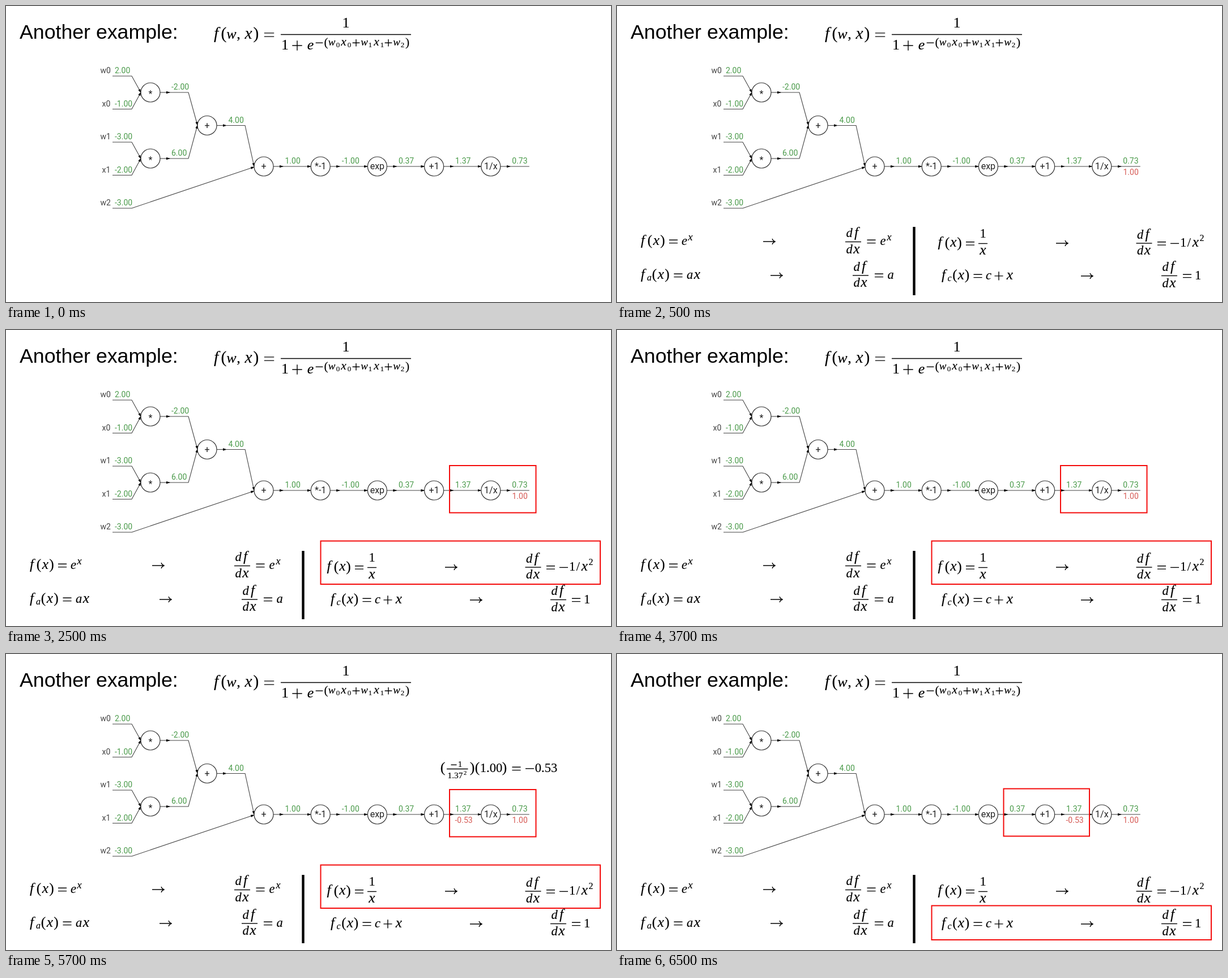
These frames come from a looping animation (1068x524 px, 8000 ms). An HTML page:

```html
<!DOCTYPE html>
<html lang="en">
<head>
<meta charset="utf-8">
<title>Backpropagation example</title>
<style>
  html, body { margin: 0; width: 100%; height: 100%; overflow: hidden; background: #fff; }
  svg { display: block; width: 100vw; height: 100vh; }
  .title { font: 35.7px "Liberation Sans", Arial, sans-serif; }
  .label { font: 14px Roboto, sans-serif; fill: #444; }
  .node { font: 16px Roboto, sans-serif; fill: #222; text-anchor: middle; }
  .value { font: 14px Roboto, sans-serif; fill: #4a9a4a; }
  .grad { font: 14px Roboto, sans-serif; fill: #d65a55; }
  .math { font-family: "Liberation Serif", "Times New Roman", serif; text-anchor: middle; stroke: #000; stroke-width: .15; }
  .op { fill: none; stroke: #000; stroke-width: 1.4; }
  .wire { fill: none; stroke: #444; stroke-width: 1.1; marker-end: url(#tip); }
  .end { marker-end: none; }
  .ring { fill: #fff; stroke: #333; stroke-width: 1.2; }
  .frame { fill: none; stroke: #f40b0b; stroke-width: 2; }
</style>
</head>
<body>
<svg viewBox="0 0 1068 524">
  <defs>
    <marker id="tip" markerUnits="userSpaceOnUse" markerWidth="7" markerHeight="5" refX="6" refY="2.5" orient="auto">
      <path d="M0 .3 7 2.5 0 4.7z" fill="#000"/>
    </marker>
  </defs>
</svg>
<script>
const LOOP = 8000;
const svg = document.querySelector("svg");
const scenes = [];
let layer = svg;

function add(tag, attrs, content = "") {
  const el = document.createElementNS("http://www.w3.org/2000/svg", tag);
  for (const key in attrs) el.setAttribute(key, attrs[key]);
  el.textContent = content;
  layer.append(el);
  return el;
}

// Everything drawn inside is visible from start until end.
function during(start, end, draw) {
  const el = add("g", {});
  scenes.push({ el, start, end });
  layer = el;
  draw();
  layer = svg;
}

const text = (cls, x, y, s) => add("text", { class: cls, x, y }, s);
const path = (cls, d) => add("path", { class: cls, d });
const bar = (x1, x2, y) => path("op", `M${x1} ${y}H${x2}`);
const frame = (x, y, x2, y2) =>
  add("rect", { class: "frame", x, y, width: x2 - x, height: y2 - y });

function node(x, y, s, base = 5) {
  add("circle", { class: "ring", cx: x, cy: y, r: 17 });
  text("node", x, y + base, s);
}

function output(x, y, rest) {
  path("wire", `M${x + 17} ${y}h17`);
  return path("wire", `M${x + 33} ${y}${rest}`);
}

// Tokens are "glyph:centre"; operators are drawn on the math axis.
function math(size, y, tokens) {
  const axis = y - size * .25, r = size * .335;
  for (const token of tokens.split(" ")) {
    const [s, pos] = token.split(":"), x = +pos;
    const left = x - r, w = 2 * r, gap = size * .12;
    if (s === "=") path("op", `M${left} ${axis - gap}h${w}M${left} ${axis + gap}h${w}`);
    else if (s === "-") path("op", `M${left} ${axis}h${w}`);
    else if (s === "+") path("op", `M${left} ${axis}h${w}M${x} ${axis - r}v${w}`);
    else {
      const scale = /[x()f]/.test(s) ? 1.13 : 1;
      add("text", {
        class: "math", x, y: /[()]/.test(s) ? y + size * .03 : y,
        "font-size": size * scale,
        "font-style": /[a-z]/.test(s) ? "italic" : "normal"
      }, s);
    }
  }
}

function derivative(x, y) {
  bar(x - 14, x + 14, y);
  math(22.5, y - 8.5, `d:${x - 7} f:${x + 5.5}`);
  math(22.5, y + 20, `d:${x - 7} x:${x + 6}`);
}

const arrow = (x, y) =>
  path("op", `M${x} ${y}h21m-5 -5q1.5 4 5.5 5q-4 1 -5.5 5`);

function heading() {
  text("title", 24, 58, "Another example:");
  math(26, 57.5, "f:371 (:384.5 w:398 ,:410.5 x:428 ):441.5 =:464.5");
  math(26, 38, "1:600");
  bar(485, 715, 50.5);
  math(26, 76.5, "1:492.5 +:514 e:537.5");
  math(19, 70, "-:553 (:565 w:575 x:596 +:618 w:632.5 x:654 +:675 w:689.5 ):708.5");
  math(13, 73, "0:586 0:606 1:643 1:664 2:700");
}

function graph() {
  const inputs = [["w0", "2.00"], ["x0", "-1.00"], ["w1", "-3.00"], ["x1", "-2.00"], ["w2", "-3.00"]];
  inputs.forEach(([name, value], i) => {
    const y = 124 + i * 58.5;
    const target = i < 4 ? `238 ${i < 2 ? 153 : 270}` : "438 285";
    path("wire", `M188 ${y}H222L${target}`);
    text("label", name[0] === "w" ? 166.5 : 169.5, y - 5, name);
    text("value", 192, y - 5, value);
  });
  output(255, 153, "H322L338 211");
  output(255, 270, "H322L338 211");
  output(355, 211.5, "H422L438 284");
  text("value", 292, 148, "-2.00");
  text("value", 292, 265, "6.00");
  text("value", 392.5, 206.5, "4.00");
  node(255, 153, "*", 8);
  node(255, 270, "*", 8);
  node(355, 211.5, "+");

  const chain = [["+", "1.00"], ["*-1", "-1.00"], ["exp", "0.37"], ["+1", "1.37"], ["1/x", "0.73"]];
  chain.forEach(([name, value], i) => {
    const x = 455 + i * 100.2, last = i === chain.length - 1;
    const wire = output(x, 284, last ? "h35" : "h50");
    if (last) wire.classList.add("end");
    text("value", x + 37.5, 279, value);
    node(x, 284, name);
  });
}

function rules() {
  math(22.5, 422.5, "f:45.5 (:58 x:69.5 ):80.5 =:99.5 e:119");
  math(16, 415, "x:129.5");
  arrow(258, 417);
  derivative(417, 417.5);
  math(22.5, 422.5, "=:449 e:469.5");
  math(16, 415, "x:480.5");

  math(22.5, 482.5, "f:45.5 (:66 x:77.5 ):88.5 =:108 a:128.5 x:141.5");
  math(16, 486, "a:57");
  arrow(271, 477);
  derivative(430, 477);
  math(22.5, 482.5, "=:462.5 a:483");

  add("rect", { x: 522.3, y: 391, width: 4.4, height: 121 });

  math(22.5, 426, "f:570 (:583 x:594 ):604.5 =:623.5");
  math(22.5, 410, "1:646");
  bar(638, 654, 420.5);
  math(22.5, 440, "x:646");
  arrow(775, 420);
  derivative(930.5, 420);
  math(22.5, 426, "=:961.5 -:984.5 1:999.5 /:1010 x:1021.5");
  math(16, 416, "2:1032.5");

  math(22.5, 483.5, "f:576.5 (:596.5 x:607.5 ):618 =:637 c:656 +:674 x:693.5");
  math(16, 487, "c:587");
  arrow(819, 478);
  derivative(975, 477.5);
  math(22.5, 483.5, "=:1006.5 1:1025.5");
  text("grad", 893.5, 299, "1.00");
}

function substitution() {
  math(23, 208.5, "(:771 ):823");
  math(15, 200, "-:790.5 1:801.5");
  bar(778, 815.5, 203.5);
  math(15.5, 220, "1.37:793");
  math(10.5, 214, "2:810.5");
  math(22.5, 208.5, "(:832 1.00:856.5 ):880 =:901 -:924.5 0.53:953.5");
}

heading();
graph();
during(500, LOOP, rules);
during(2500, 6500, () => {
  frame(783, 240, 935.5, 323.5);
  frame(555.5, 373.5, 1049, 450);
});
during(4500, 6500, substitution);
during(4500, LOOP, () => text("grad", 792.5, 299, "-0.53"));
during(6500, LOOP, () => {
  frame(682.5, 238.5, 834, 322.5);
  frame(555.5, 445.5, 1049, 506);
});

const began = performance.now();
function tick() {
  const t = (performance.now() - began) % LOOP;
  for (const { el, start, end } of scenes)
    el.style.display = t >= start && t < end ? "" : "none";
  requestAnimationFrame(tick);
}
tick();
</script>
</body>
</html>
```
